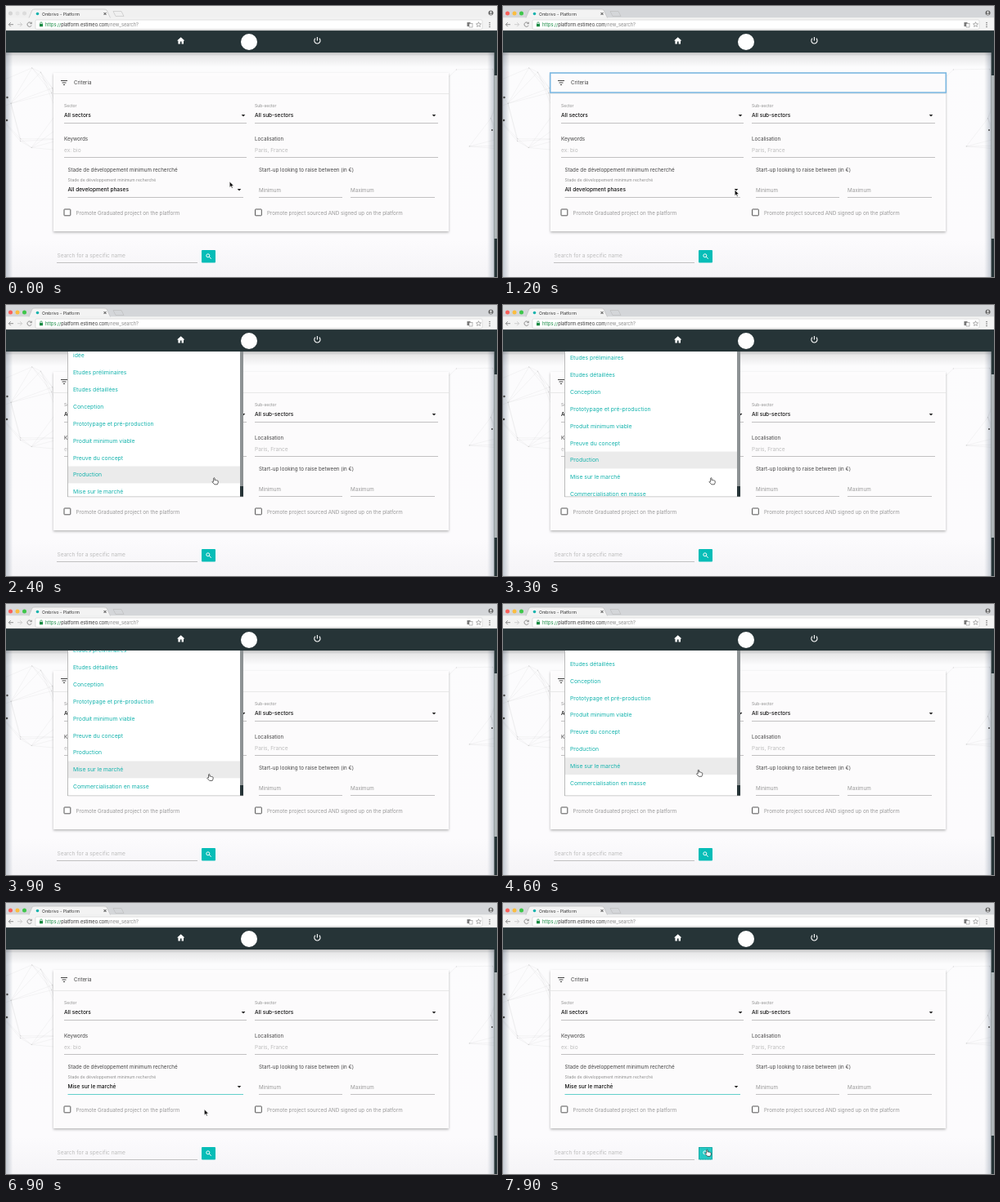
An HTML page for the animation above (8000 ms loop, 600x332 px).

```html
<!DOCTYPE html>
<html lang="fr">
<head>
<meta charset="utf-8">
<title>Platform search</title>
<style>
  html, body { margin: 0; width: 100%; height: 100%; overflow: hidden; background: #fcfbfd; }
  svg { display: block; }
  text { font: 6.25px Inter, "Open Sans", sans-serif; fill: #444; white-space: pre; }
  .chrome { font-size: 5.65px; fill: #333; }
  .label { font-size: 5.03px; fill: #8b8b8b; }
  .value { font-size: 6.52px; font-weight: 500; fill: #111; }
  .hint { fill: #bdbdbd; font-size: 6.6px; }
  .soft { fill: #999; }
  .item { font-size: 6.85px; fill: #14b3ad; }
  .rule { stroke: #a9a9a9; stroke-width: .7; }
  .icon { fill: none; stroke: #444; stroke-width: 1; }
</style>
</head>
<body>
<svg width="600" height="332" viewBox="0 0 600 332">
  <defs>
    <linearGradient id="page" x2="0" y2="1"><stop stop-color="#fcfcfd"/><stop offset=".85" stop-color="#fcfbfd"/><stop offset="1" stop-color="#f5f4f7"/></linearGradient>
    <linearGradient id="edges"><stop stop-color="#c3c9d2"/><stop offset=".014" stop-color="#c3c9d2" stop-opacity="0"/><stop offset=".986" stop-color="#c3c9d2" stop-opacity="0"/><stop offset="1" stop-color="#c3c9d2"/></linearGradient>
    <linearGradient id="headerShade" x2="0" y2="1"><stop stop-opacity=".3"/><stop offset=".25" stop-opacity=".1"/><stop offset="1" stop-opacity="0"/></linearGradient>
    <filter id="shadow" x="-10%" y="-10%" width="120%" height="125%"><feDropShadow dx="0" dy="1.5" stdDeviation="1.8" flood-opacity=".36"/></filter>
    <clipPath id="panel"><rect x="75" y="57" width="216" height="178.5"/></clipPath>
  </defs>

  <rect y="30" width="600" height="302" fill="url(#page)"/>
  <rect y="57" width="596.5" height="275" fill="url(#edges)"/>
  <g id="mesh" stroke="#777" stroke-width=".5"></g>

  <!-- Criteria card -->
  <rect x="58" y="82" width="483" height="194" fill="#fff" fill-opacity=".8" filter="url(#shadow)"/>
  <rect x="58" y="82" width="483" height="194" fill="#fefdfe" fill-opacity=".8"/>
  <path d="M58 107.500H541" stroke="#e4e4e4" stroke-width=".8"/>
  <path class="icon" d="M67 91.500h8M68.500 94h5M70 96.500h2"/>
  <text x="83" y="96">Criteria</text>
  <rect id="focusRing" x="57.700" y="82" width="483.600" height="24" fill="none" stroke="#7cb8e2" stroke-width="1.600"/>
  <g id="form"></g>
  <text id="phase" class="value" x="75.500" y="227.200"></text>
  <path id="phaseRule" class="rule" d="M75.500 234.500H290"/>

  <!-- Name search -->
  <text class="hint" x="62.500" y="307.500">Search for a specific name</text>
  <path class="rule" d="M62 314.500H234"/>
  <rect id="button" x="239" y="299" width="17" height="15.500" rx="1" fill="#06bdb7"/>
  <g fill="none" stroke="#fff" stroke-width="1"><circle cx="246.800" cy="305.800" r="2"/><path d="M248.300 307.300l2.400 2.400"/></g>
  <rect id="buttonFocus" x="239.500" y="299.500" width="16" height="14.500" fill="none" stroke="#087a78" stroke-width=".7" stroke-dasharray="1 1"/>

  <!-- Page header -->
  <rect y="57" width="596.5" height="18" fill="url(#headerShade)" opacity=".8"/>

  <!-- Drop-down list -->
  <g id="dropdown" clip-path="url(#panel)">
    <rect x="75.500" y="40" width="214.500" height="195" fill="#fff"/>
    <g id="list"><rect id="hover" x="76" width="210" height="20.850" fill="#ebebeb"/></g>
    <rect x="286" y="57" width="4" height="165" fill="#8d9294"/>
    <rect x="286" y="222" width="4" height="13" fill="#263437"/>
    <path d="M75.500 57V235H290" fill="none" stroke="#aaa" stroke-width=".8"/>
  </g>

  <rect x="596.500" y="30" width="3.500" height="302" fill="#263437"/>
  <rect x="596.500" y="85" width="3.500" height="200" fill="#b0b7ba"/>
  <rect y="30" width="597" height="27" fill="#263437"/>
  <path d="M209 42.500l4.700-4.300 4.700 4.300h-1.400v4h-2.400v-3h-1.800v3h-2.400v-4z" fill="#fff"/>
  <circle cx="297" cy="44" r="10" fill="#fff"/>
  <path d="M378 39.700a3.600 3.600 0 1 0 4.800 0M380.400 38v4.600" fill="none" stroke="#fff" stroke-width="1.100"/>

  <!-- Browser window -->
  <rect id="tabbar" width="600" height="15"/>
  <rect y="14.200" width="600" height="15.800" fill="#f3f3f3"/>
  <path d="M0 29.800H600" stroke="#bbb" stroke-width=".5"/>
  <path d="M28 14.500L32 5Q33 4 35 4H120Q122 4 123 5L127.500 14.500" fill="#f3f3f3" stroke="#bbb" stroke-width=".6"/>
  <path d="M131 6.500h10l3 6h-10z" fill="none" stroke="#b5b5b5" stroke-width=".5"/>
  <g id="lights"><circle cx="5.500" cy="9" r="2.500" fill="#f9605a"/><circle cx="14" cy="9" r="2.500" fill="#fbbd3f"/><circle cx="22.500" cy="9" r="2.500" fill="#3ec74b"/></g>
  <circle cx="38.500" cy="9.500" r="1.800" fill="#14b3ad"/>
  <text class="chrome" x="44" y="11.500" style="font-size:5.1px">Ombrivo - Platform</text>
  <path class="icon" d="M119.500 8l3 3m0-3l-3 3" stroke-width=".7"/>
  <circle cx="592.500" cy="8.500" r="3" fill="#666"/><path d="M590.500 10.500q2-2 4 0z" fill="#fff"/><circle cx="592.500" cy="7.700" r="1.100" fill="#fff"/>
  <rect x="36" y="17" width="546" height="11.500" rx="1.500" fill="#fff" stroke="#cfcfcf" stroke-width=".6"/>
  <path class="icon" d="M9 22.700H3.500m2.300-2.500L3.300 22.700l2.500 2.500" style="stroke:#777;stroke-width:.8"/>
  <path d="M14 22.700h5.500m-2.300-2.500l2.500 2.500-2.500 2.500" fill="none" stroke="#c5c5c5" stroke-width=".8"/>
  <path class="icon" d="M31 21.200a2.700 2.700 0 1 0 .2 2.500M31.300 19.700v2h-2" style="stroke:#777;stroke-width:.8"/>
  <rect x="41" y="22" width="4" height="3.200" fill="#168a42"/><path d="M41.800 22v-1a1.200 1.200 0 0 1 2.400 0v1" fill="none" stroke="#168a42" stroke-width=".7"/>
  <text class="chrome" x="48" y="25"><tspan fill="#168a42">https://</tspan>platform.estimeo.com<tspan fill="#888">/new_search?</tspan></text>
  <rect x="563.500" y="20" width="4" height="5" fill="#777"/><rect x="566" y="21.500" width="4" height="4.500" fill="#fff" stroke="#888" stroke-width=".6"/>
  <path d="M577.500 19.700l.9 2 2.100.2-1.600 1.400.5 2.100-1.900-1.100-1.900 1.100.5-2.100-1.600-1.400 2.100-.2z" fill="none" stroke="#777" stroke-width=".6"/>
  <g fill="#666"><circle cx="591" cy="20.500" r=".75"/><circle cx="591" cy="23" r=".75"/><circle cx="591" cy="25.500" r=".75"/></g>

  <path id="arrow" d="M0 0V7.200L1.700 5.700 2.800 8.200 4 7.700 2.900 5.300H5.200Z" fill="#111" stroke="#fff" stroke-width=".6"/>
  <path id="hand" d="M1.200 4.800V.7Q1.900-.4 2.600.7V3Q3.500 2.500 4 3.200 5 2.800 5.400 3.600 6.500 3.400 6.700 4.300V6.300L5.800 8.300H2.300L-.5 5.300Q-.3 4.100 1.200 4.800Z" fill="#fff" stroke="#222" stroke-width=".7"/>
</svg>

<script>
const $ = id => document.getElementById(id);
const LOOP = 8000, PITCH = 20.85, FIRST_ROW = 30.75;
const text = (x, y, s, cls = '') => `<text class="${cls}" x="${x}" y="${y}">${s}</text>`;
const rule = (x1, x2, y) => `<path class="rule" d="M${x1} ${y}H${x2}"/>`;
const caret = (x, y) => `<path d="M${x - 2.3} ${y}h4.600l-2.300 2.400z" fill="#222"/>`;
const checkbox = (x, s) =>
  `<rect x="${x}" y="249" width="7.800" height="7.800" rx=".6" fill="#fff" stroke="#555" stroke-width="1"/>` + text(x + 14.5, 256, s, 'soft');

$('form').innerHTML = [
  text(71, 123.5, 'Sector', 'label'), text(71, 136, 'All sectors', 'value'), rule(71, 294, 143.5), caret(290, 133),
  text(304, 123.5, 'Sub-sector', 'label'), text(304, 136, 'All sub-sectors', 'value'), rule(304, 528, 143.5), caret(523, 133),
  text(71, 164.5, 'Keywords'), text(71, 178.5, 'ex: bio', 'hint'), rule(71, 294, 185.5),
  text(304, 164.5, 'Localisation'), text(304, 178.5, 'Paris, France', 'hint'), rule(304, 528, 185.5),
  text(75.5, 203.4, 'Stade de développement minimum recherché'),
  text(75.5, 215, 'Stade de développement minimum recherché', 'label'), caret(285, 224),
  text(309, 203.4, 'Start-up looking to raise between (in €)'),
  text(309, 227.5, 'Minimum', 'soft'), rule(309, 411, 234.5),
  text(421, 227.5, 'Maximum', 'soft'), rule(421, 524, 234.5),
  checkbox(71, 'Promote Graduated project on the platform'),
  checkbox(304.5, 'Promote project sourced AND signed up on the platform'),
].join('');

const phases = ['All development phases', 'idée', 'Etudes préliminaires', 'Etudes détaillées', 'Conception',
  'Prototypage et pré-production', 'Produit minimum viable', 'Preuve du concept', 'Production',
  'Mise sur le marché', 'Commercialisation en masse'];
$('list').insertAdjacentHTML('beforeend',
  phases.map((name, i) => text(82, FIRST_ROW + (i + .5) * PITCH + 2.4, name, 'item')).join(''));

// Faint network of linked points on both sides of the page
let seed = 11;
const random = () => (seed = seed * 16807 % 2147483647) / 2147483647;
function drawMesh(left, width, top, height) {
  const points = Array.from({ length: 15 }, () => [left + random() * width, top + random() * height]);
  let out = '';
  points.forEach(([x, y], i) => {
    out += `<circle cx="${x}" cy="${y}" r=".6" fill="#777" stroke="none" opacity=".25"/>`;
    points.slice(i + 1).forEach(([u, v]) => {
      if (Math.hypot(u - x, v - y) < 55) out += `<path d="M${x} ${y}L${u} ${v}" opacity=".13"/>`;
    });
  });
  return out;
}
$('mesh').innerHTML = drawMesh(-15, 150, 70, 130) + drawMesh(455, 155, 75, 120) +
  '<g fill="#444" stroke="none"><circle cx="1.500" cy="112" r="1.200"/><circle cx="1" cy="140" r="1.300"/><circle cx="594" cy="152" r="1"/></g>';

// Keys are [time, value...]; values ease between neighbours
function track(keys, t) {
  let i = 0;
  while (i < keys.length - 2 && t >= keys[i + 1][0]) i++;
  const [a, b] = [keys[i], keys[i + 1]];
  const p = Math.min(1, Math.max(0, (t - a[0]) / (b[0] - a[0])));
  const eased = p * p * (3 - 2 * p);
  return a.slice(1).map((v, k) => v + (b[k + 1] - v) * eased);
}
const pointer = [[200, 273.2, 215], [900, 283.2, 225.2], [1600, 283.2, 225.2], [2200, 252.5, 211.5],
  [3600, 252.5, 211.5], [4300, 237, 203], [6500, 237, 203], [7300, 247.5, 302]];
const scroll = [[3000, 0], [3300, 18], [3600, 18], [4100, 30.2]];
const opening = [[1400, 0], [1600, 1], [6300, 1], [6500, 0]];

const show = (id, on) => $(id).setAttribute('visibility', on ? 'visible' : 'hidden');

function render(t) {
  const [x, y] = track(pointer, t), [offset] = track(scroll, t), [open] = track(opening, t);
  const active = t >= 1000, onList = t >= 1700 && t < 6600, onButton = t >= 7150;
  show('arrow', !onList && !onButton);
  show('hand', onList || onButton);
  for (const id of ['arrow', 'hand']) $(id).setAttribute('transform', `translate(${x} ${y})`);

  // The window is in the background until the first click
  $('tabbar').setAttribute('fill', active ? '#d4d6d9' : '#f0f0f0');
  $('lights').style.filter = active ? '' : 'grayscale(1) opacity(.25)';

  $('dropdown').setAttribute('opacity', open);
  $('list').setAttribute('transform', `translate(0 ${-offset})`);
  const row = t < 3700 ? 8 : 9;
  $('hover').setAttribute('y', FIRST_ROW + row * PITCH);
  show('hover', onList);

  show('focusRing', active && t < 1400);
  $('phase').textContent = phases[t < 6300 ? 0 : 9];
  $('phaseRule').style.stroke = t >= 1400 ? '#22bdb7' : '';
  $('button').setAttribute('fill', onButton ? '#25c9c4' : '#06bdb7');
  show('buttonFocus', t >= 7600);
}

function frame() {
  render(performance.now() % LOOP);
  requestAnimationFrame(frame);
}
frame();
</script>
</body>
</html>
```
